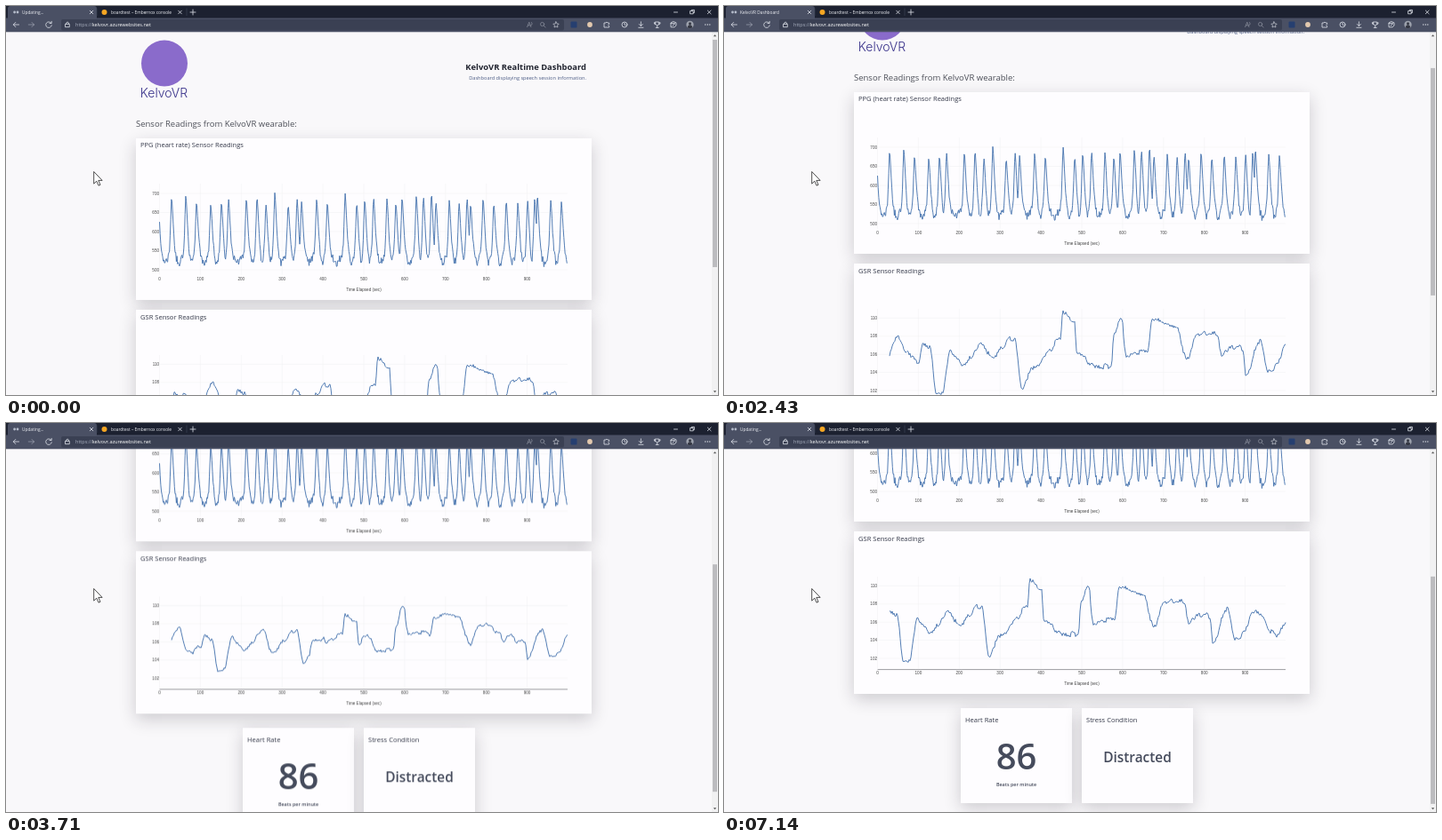
An HTML page that plays this animation: 800x438 px, repeating every 8000 ms.

```html
<!DOCTYPE html>
<html lang="en">
<head>
<meta charset="utf-8">
<title>Sensor dashboard</title>
<style>
html, body { margin: 0; width: 100%; height: 100%; overflow: hidden; background: #fff; }
#stage { position: relative; width: 800px; height: 438px; overflow: hidden; font-family: "Open Sans", "Noto Sans", sans-serif; }
#stage svg { position: absolute; left: 0; top: 0; overflow: visible; }
#page { position: absolute; left: 0; top: 0; width: 800px; height: 658px; background: #f9f8fa; --k: -1; }
.card { position: absolute; background: #fefdff; box-shadow: 0 6px 18px rgba(30, 25, 40, .2); }
#page, #thumb { animation: scroll 8s ease-in-out infinite; }
#thumb { --k: .613; }
@keyframes scroll {
  0%, 24.4% { transform: none; }
  30%, 31.2% { transform: translateY(calc(var(--k) * 52px)); }
  35.6%, 36.9% { transform: translateY(calc(var(--k) * 103px)); }
  41.2%, 43.7% { transform: translateY(calc(var(--k) * 155px)); }
  47.5%, 48.1% { transform: translateY(calc(var(--k) * 207px)); }
  51.2%, 59% { transform: translateY(calc(var(--k) * 222px)); }
  60%, 100% { transform: translateY(calc(var(--k) * 220px)); }
}
#gsr { animation: morph 8s ease-in-out infinite; }
@keyframes morph {
  0%, 2% { d: var(--g0); }
  8.5%, 44% { d: var(--g1); }
  50.5%, 100% { d: var(--g2); }
}
.busy { animation: busy 8s step-end infinite; }
.idle { animation: idle 8s step-end infinite; }
.early { animation: early 8s step-end infinite; }
.late { animation: late 8s step-end infinite; }
@keyframes busy { 0%, 42.5%, 88.75% { visibility: visible; } 10.75%, 53.6%, 100% { visibility: hidden; } }
@keyframes idle { 0%, 42.5%, 88.75% { visibility: hidden; } 10.75%, 53.6%, 100% { visibility: visible; } }
@keyframes early { 0% { visibility: visible; } 44.5%, 100% { visibility: hidden; } }
@keyframes late { 0% { visibility: hidden; } 44.5%, 100% { visibility: visible; } }
.head { font-size: 7.55px; fill: #353a4a; }
.tick { font: 4.6px "Liberation Sans", Arial, sans-serif; fill: #444; }
.mid { text-anchor: middle; }
.end { text-anchor: end; }
.bold { font-weight: 600; fill: #454b5c; }
.grid { stroke: #f1f1f4; stroke-width: .6; }
.line { fill: none; stroke: #4a76b0; stroke-width: .95; stroke-linejoin: round; }
.tab { font-size: 4.8px; fill: #eef0f5; }
.icon { fill: none; stroke: #dfe2ea; stroke-width: .8; stroke-linecap: round; stroke-linejoin: round; }
</style>
</head>
<body>
<div id="stage">
  <div id="page">
    <div class="card" style="left:146px;top:149px;width:512px;height:182px"></div>
    <div class="card" style="left:146px;top:342px;width:512px;height:182.5px"></div>
    <div class="card" style="left:266px;top:541px;width:125px;height:107px"></div>
    <div class="card" style="left:402px;top:541px;width:125px;height:107px"></div>
    <svg width="800" height="658">
      <circle cx="178" cy="64.5" r="26" fill="#8a6bcb"/>
      <text x="177.5" y="102.5" class="mid" font-size="14" font-weight="300" fill="#38318a" style="font-family:Inter,sans-serif">KelvoVR</text>
      <text x="652" y="71.8" class="end" font-size="9.4" font-weight="700" fill="#20232e">KelvoVR Realtime Dashboard</text>
      <text x="652" y="83.4" class="end" font-size="5.63" fill="#4c5c85">Dashboard displaying speech session information.</text>
      <text x="146" y="135.8" font-size="9.5" fill="#4c4f58">Sensor Readings from KelvoVR wearable:</text>

      <text x="151" y="159.3" class="head">PPG (heart rate) Sensor Readings</text>
      <g id="ppgAxes"></g>
      <path id="ppg" class="line"/>

      <text x="151" y="352.9" class="head">GSR Sensor Readings</text>
      <g id="gsrAxes"></g>
      <path d="M172.5 497.6H631" stroke="#85858a" stroke-width=".8"/>
      <path id="gsr" class="line"/>

      <text x="271" y="557" class="head">Heart Rate</text>
      <text x="407" y="557" class="head">Stress Condition</text>
      <g class="mid bold">
        <g class="early"><text x="328.5" y="609.5" font-size="40">72</text><text x="464.5" y="602" font-size="15.4">Stressed</text></g>
        <g class="late"><text x="328.5" y="609.5" font-size="40">86</text><text x="464.5" y="602" font-size="15.4">Distracted</text></g>
        <text x="328.5" y="629" font-size="5.45">Beats per minute</text>
      </g>
    </svg>
  </div>

  <svg width="800" height="438">
    <!-- scrollbar -->
    <rect x="793" y="29" width="7" height="409" fill="#f1f1f2"/>
    <rect id="thumb" x="794" y="38" width="5" height="256" fill="#bcbcbf"/>
    <path d="M794.8 34.3h3.4l-1.7-2zM794.8 433.2h3.4l-1.7 2z" fill="#555"/>

    <!-- browser frame -->
    <rect width="800" height="14" fill="#1c2130"/>
    <path d="M2 14V3q0-3 3-3H99q3 0 3 3V14z" fill="#4a5064"/>
    <rect y="13.5" width="800" height="15.8" fill="#4a5064"/>
    <rect x="62" y="15" width="565" height="12.4" rx="2" fill="#3a4053"/>
    <path d="M102 2.5V11M203 2.5V11" stroke="#3c4254" stroke-width=".7"/>
    <g fill="#b5bccb"><circle cx="9.6" cy="7" r="1.4"/><circle cx="13" cy="7" r="1.4"/></g>
    <text x="18" y="8.6" class="tab busy">Updating...</text>
    <text x="18" y="8.6" class="tab idle">KelvoVR Dashboard</text>
    <circle cx="110.5" cy="7" r="3" fill="#f5a623"/>
    <text x="118" y="8.6" class="tab">boardtest – Embernox console</text>
    <g class="icon">
      <path d="M94.2 5.2l3.6 3.6m0-3.6l-3.6 3.6M193.7 5.2l3.6 3.6m0-3.6l-3.6 3.6M207 7h6m-3-3v6"/>
      <path d="M750.5 7h4M769 5.6h3.2v3.2H769zM770.2 5.4v-1h3.2v3.2h-1M788.3 5l3.8 3.8m0-3.8l-3.8 3.8"/>
      <path d="M14.5 21H8.3m2.5-2.6L8.3 21l2.5 2.6"/>
      <path d="M25.3 21h6.2m-2.5-2.6l2.5 2.6l-2.5 2.6" opacity=".5"/>
      <path d="M50.8 19.3a3.3 3.3 0 1 0 .5 2.5M51.2 17.3v2.2H49"/>
      <path d="M66.9 20.3h4.4v3.4h-4.4zM67.8 20.2v-1.3q1.3-1.8 2.6 0v1.3"/>
      <g opacity=".45">
        <path d="M585.6 23.6l2.2-5.4l2.1 5.4m-3.5-1.8h2.8M590.6 18.5q1.4 1.5 0 3"/>
        <circle cx="602.6" cy="20.5" r="2.1"/><path d="M604.2 22.1l2 2"/>
      </g>
      <path opacity=".75" d="M618 17.8l1 2.1 2.2.3-1.6 1.6.3 2.2-1.9-1-2 1 .4-2.2-1.6-1.6 2.2-.3z"/>
      <path d="M672.4 19h1.6q.8-2 2 0h1.6v1.6q-1.8.8 0 2V24h-5.2z"/>
      <circle cx="695" cy="21" r="3"/><path d="M695 19.3V21l1.4.9"/>
      <path d="M713.4 17.8v4.6m-2-1.9l2 2l2-2M710.8 24.3h5.2"/>
      <path d="M729.7 18h4v2.6q-2 2.6-4 0zM731.7 22.2v2.2m-1.5 0h3M729.5 18.8h-1.3q0 2 1.6 2M733.9 18.8h1.3q0 2-1.6 2"/>
      <path d="M747 19.4h4.2m-4.2 0v4.4h4.2l1.8-1.8v-3.2l-3-1.2zM749.2 21.7l2.3-1.6"/>
    </g>
    <text x="78" y="23" font-size="5.5" fill="#a9b0c0">https://<tspan fill="#fff">kelvovr.azurewebsites.net</tspan></text>
    <rect x="634.5" y="17.5" width="7" height="7" rx="1" fill="#263f70"/>
    <circle cx="656" cy="21" r="2.9" fill="#e3c9ae"/>
    <circle cx="768.5" cy="21" r="4.2" fill="#9ba0ab"/>
    <path d="M765.8 24.2q.3-3 2.7-3t2.7 3q-2.7 1.9-5.4 0z" fill="#343743"/>
    <circle cx="768.5" cy="19.7" r="1.5" fill="#343743"/>
    <g fill="#e5e7ed"><circle cx="785.8" cy="21" r=".65"/><circle cx="788.3" cy="21" r=".65"/><circle cx="790.8" cy="21" r=".65"/></g>

    <path d="M98.7 186.5v13.6l3.1-2.9l2.2 5l2-.9l-2.2-4.9h4.3z" fill="#fff" stroke="#222" stroke-width=".8"/>
  </svg>
</div>
<script>
const $ = id => document.getElementById(id);
const LEFT = 172.5, RIGHT = 631, UNIT = .459;

// repeatable noise in -1..1
const noise = n => {
  const s = Math.sin(n * 127.1 + 11.7) * 43758.5453;
  return (s - Math.floor(s)) * 2 - 1;
};

function plot(from, to, step, y) {
  const pts = [];
  for (let x = from; x <= to; x += step) pts.push(x.toFixed(1) + ' ' + y(x).toFixed(1));
  return 'M' + pts.join('L');
}

function drawAxes(id, top, bottom, first, step, y0, gap) {
  let s = '';
  for (let i = 0; i < 5; i++) {
    const y = y0 + i * gap;
    s += `<path class="grid" d="M${LEFT} ${y}H${RIGHT}"/><text class="tick end" x="172" y="${y + 1.6}">${first - i * step}</text>`;
  }
  for (let v = 0; v < 1000; v += 100) {
    const x = LEFT + v * UNIT;
    s += `<path class="grid" d="M${x} ${top}V${bottom}"/><text class="tick mid" x="${x}" y="${bottom + 6.3}">${v}</text>`;
  }
  s += `<text class="tick mid" x="402" y="${bottom + 18.7}">Time Elapsed (sec)</text>`;
  $(id).innerHTML = s;
}
drawAxes('ppgAxes', 200, 302.5, 700, 50, 211, 21.5);
drawAxes('gsrAxes', 393, 496.5, 110, 2, 403.4, 20.4);

// heartbeat: a steep rise and slower fall at each beat, over a sagging noisy base
const beats = [171, 186, 202, 214, 230, 242, 250, 270, 282, 292, 302, 317, 327, 332, 349, 361, 381,
  394, 403, 413, 428, 438, 445, 461, 469, 478, 483, 498, 509, 518, 522, 536, 548, 562, 575, 586,
  594, 597, 612, 624, 640];

function ppgY(x) {
  const next = beats.findIndex(b => b > x);
  const a = beats[next - 1], b = beats[next];
  const base = 290 - 13 * Math.abs(2 * (x - a) / (b - a) - 1);
  const pulse = beat => {
    const d = x - beat;
    const height = base - 217 - noise(beat) * 7;
    return height * Math.exp(-(Math.abs(d / (d < 0 ? 1.4 : 2.5)) ** 1.6));
  };
  const rise = Math.max(pulse(a), pulse(b));
  return base - rise + noise(x) * 4.5 * (1 - Math.min(1, rise / 50));
}
$('ppg').setAttribute('d', plot(LEFT, RIGHT, .7, ppgY));

// skin response: key levels joined by eased steps, with coarse and fine jitter
const levels = [[112, 438], [149, 443], [158, 425], [168, 440], [182, 455], [186, 433], [194, 436],
  [202, 491], [208, 488], [217, 443], [232, 458], [252, 430], [264, 448], [289, 425], [298, 482],
  [312, 458], [341, 430], [344, 397], [357, 409], [359, 442], [380, 458], [398, 456], [401, 422],
  [410, 406], [414, 444], [439, 440], [444, 403], [472, 412], [483, 450], [494, 424], [517, 419],
  [522, 442], [546, 436], [550, 470], [564, 428], [577, 466], [597, 430], [620, 460], [632, 447]];

function gsrY(x) {
  const n = Math.max(1, levels.findIndex(p => p[0] >= x));
  const [x0, y0] = levels[n - 1], [x1, y1] = levels[n];
  const p = (x - x0) / (x1 - x0);
  return y0 + (y1 - y0) * p * p * (3 - 2 * p) + noise(Math.floor(x / 5)) * 3.5 + noise(x) * 1.8;
}
[74, 37, 0].forEach((shift, i) => {
  const d = plot(186, RIGHT, 1, x => gsrY(x - shift));
  $('gsr').style.setProperty('--g' + i, `path("${d}")`);
});
</script>
</body>
</html>
```
